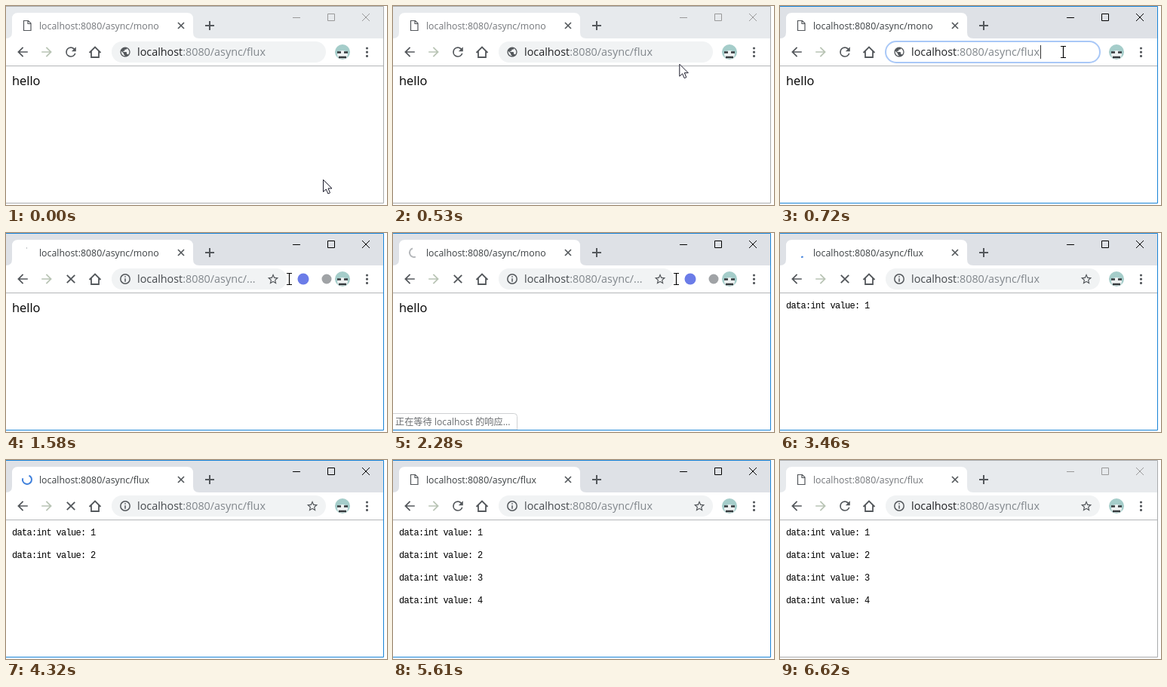
These frames come from a looping animation (505x264 px, 6.74 s). An HTML page:

```html
<!DOCTYPE html>
<html lang="en">
<head>
<meta charset="utf-8">
<title>Streaming response</title>
<style>
  html, body { margin: 0; width: 100%; height: 100%; overflow: hidden; background: #fff; }
  svg { display: block; }
  text { font-family: "Open Sans", "Noto Sans CJK SC", "Noto Sans CJK", sans-serif; white-space: pre; }
  .line { fill: none; stroke: #54585c; }
  .icon { fill: #54585c; }
  #values text { font: 12px "Liberation Mono", monospace; letter-spacing: -.7px; }
</style>
</head>
<body>
<svg width="505" height="264" viewBox="0 0 505 264">
  <rect width="505" height="264" fill="#fff"/>

  <!-- tab strip -->
  <rect id="strip" width="500" height="43"/>
  <path d="M0 43Q8 43 8 35V17Q8 9 16 9H240Q248 9 248 17V35Q248 43 256 43Z" fill="#fff"/>
  <path id="page" class="line" d="M23.5 19.5H29.5L33 23V32.5H23.5ZM29 19.5V23.5H33" stroke-width="1.2"/>
  <circle id="spinner" cx="28" cy="26" r="6" fill="none" stroke-width="2" pathLength="360"/>
  <text id="title" x="44" y="31" font-size="12.35"></text>
  <path class="line" d="M228 22L236 30M236 22L228 30" stroke-width="1.7"/>
  <path class="line" d="M264 26H276M270 20V32" stroke-width="2"/>
  <path id="controls" fill="none" d="M380 15.5H390M426.5 10.5H435.5V19.5H426.5ZM472 10L482 20M482 10L472 20"/>

  <!-- toolbar -->
  <path id="back" class="icon" transform="translate(11.8 50.8) scale(.85)" d="M20 11H7.83l5.59-5.59L12 4l-8 8 8 8 1.41-1.41L7.83 13H20z"/>
  <path fill="#b9c4b5" transform="translate(64.2 50.8) scale(-.85 .85)" d="M20 11H7.83l5.59-5.59L12 4l-8 8 8 8 1.41-1.41L7.83 13H20z"/>
  <path id="reload" class="icon" transform="translate(75.8 50.8) scale(.85)" d="M17.65 6.35A7.96 7.96 0 0 0 12 4a8 8 0 1 0 7.73 10h-2.08A6 6 0 1 1 12 6c1.66 0 3.14.69 4.22 1.78L13 11h7V4z"/>
  <path id="stop" class="line" d="M80.8 55.8L91.2 66.2M91.2 55.8L80.8 66.2" stroke-width="1.9"/>
  <path class="line" d="M110.5 62L118 54.5L125.5 62M113 60V68H123V60" stroke-width="1.8"/>
  <rect id="pill" y="47" x="140" height="28" rx="14"/>
  <path id="globe" class="icon" transform="translate(150.1 53.1) scale(.66)" d="M12 2C6.48 2 2 6.48 2 12s4.48 10 10 10 10-4.48 10-10S17.52 2 12 2zm-1 17.93c-3.95-.49-7-3.85-7-7.93 0-.62.08-1.21.21-1.79L9 15v1c0 1.1.9 2 2 2v1.93zm6.9-2.54c-.26-.81-1-1.39-1.9-1.39h-1v-3c0-.55-.45-1-1-1H8v-2h2c.55 0 1-.45 1-1V7h2c1.1 0 2-.9 2-2v-.41c2.93 1.19 5 4.06 5 7.41 0 2.08-.8 3.97-2.1 5.39z"/>
  <g id="info" class="line" stroke-width="1.5">
    <circle cx="158" cy="61" r="6.2"/>
    <path d="M158 57.2V58.8M158 60.2V64.8"/>
  </g>
  <rect id="selection" x="174" y="51" width="171" height="20" fill="#0078d7"/>
  <text y="66" x="174" font-size="14.37"><tspan id="host">localhost</tspan><tspan id="path"></tspan></text>
  <path id="caret" d="M345.5 52V70" stroke="#333"/>
  <path id="star" class="icon" d="M22 9.24l-7.19-.62L12 2 9.19 8.63 2 9.24l5.46 4.73L5.82 21 12 17.27 18.18 21l-1.63-7.03zM12 15.4l-3.76 2.27 1-4.28-3.32-2.88 4.38-.38L12 6.1l1.71 4.04 4.38.38-3.32 2.88 1 4.28z"/>
  <g id="extensions">
    <circle cx="394" cy="61" r="7.5" fill="#6b7ce8"/>
    <circle cx="425" cy="61" r="6.5" fill="#a0a3a6"/>
  </g>
  <circle cx="446" cy="61" r="10" fill="#a5cdca"/>
  <ellipse cx="446" cy="64.5" rx="7" ry="5.5" fill="#eef2f2"/>
  <path d="M439 61.5H444M448 61.5H453M441 68H451" stroke="#34393c" stroke-width="2.4"/>
  <path d="M478.5 56v0M478.5 61.2v0M478.5 66.4v0" stroke="#54585c" stroke-width="3.2" stroke-linecap="round"/>
  <path d="M0 79.5H500" stroke="#b4b6b8"/>

  <!-- page -->
  <text id="hello" x="8" y="105" font-size="16.4">hello</text>
  <g id="values"></g>
  <g id="status">
    <path d="M0 239.5H160.5Q164.5 239.5 164.5 243.5V261H0" fill="#fff" stroke="#cfd1d3"/>
    <text x="3" y="255" font-size="12.2" fill="#6a6d70">正在等待 localhost 的响应...</text>
  </g>
  <path id="border" fill="none" d="M0 .5H500.5V261.5H0"/>

  <path id="arrow" d="M0 0V16L3.8 12.6L6.4 18.5L9 17.4L6.5 11.5H11.5Z" fill="#fff" stroke="#1a1a2a"/>
  <path id="beam" fill="none" d="M-3.5 -7.5H3.5M0 -7.5V7.5M-3.5 7.5H3.5" stroke="#000" stroke-width="1.2"/>
</svg>
<script>
const LOOP = 6740, FOCUS = 715, SELECT = 890, ENTER = 1575, COMMIT = 2550, DONE = 5600, BLUR = 6615;
const $ = id => document.getElementById(id);
const show = (id, on) => $(id).style.display = on ? '' : 'none';
const set = (id, attrs) => { for (const k in attrs) $(id).setAttribute(k, attrs[k]); };
const write = (id, text) => { if ($(id).textContent !== text) $(id).textContent = text; };
const ease = u => u * u * (3 - 2 * u);
const clamp = u => Math.min(1, Math.max(0, u));

$('values').innerHTML = [1, 2, 3, 4]
  .map(n => `<text x="8" y="${70 + 30 * n}">data:int value: ${n}</text>`).join('');

// Grey arc runs counter-clockwise while waiting; blue arc grows and shrinks while loading.
function drawSpinner(t) {
  let start, sweep;
  if (t < COMMIT) {
    const turn = (t - 1550) / 1320 * 360;
    start = -90 - turn;
    sweep = Math.min(turn, 180);
  } else {
    const e = t - 1590, step = Math.floor(e / 666);
    sweep = 270 * ease(e % 666 / 666) - (step % 2 ? 0 : 270);
    start = 110 + e / 1568 * 360 + Math.floor(step / 2) % 4 * 270;
    if (sweep < 0) { start += sweep; sweep = -sweep; }
    sweep = Math.max(sweep, 5);
  }
  set('spinner', {
    stroke: t < COMMIT ? '#b4b7ba' : '#3f80dc',
    'stroke-dasharray': `${sweep} 360`,
    transform: `rotate(${start} 28 26)`
  });
}

function drawPointer(t) {
  const u = ease(clamp((t - 70) / 570));
  let x = 420.5 - 45 * u, y = 230.5 - 169.5 * u;
  const leaving = t >= 6120 && t < 6280;
  if (leaving) {
    const p = (t - 6120) / 160;
    x = 471 + 7 * p;
    y = 257 - 6.5 * Math.sin(p * Math.PI);
  }
  const text = y < 75;
  show('arrow', leaving || t < COMMIT && !text);
  show('beam', t < COMMIT && text);
  set(text ? 'beam' : 'arrow', { transform: `translate(${x} ${y})` });
}

function draw(t) {
  const active = t >= FOCUS && t < BLUR;
  const editing = t >= FOCUS && t < ENTER;
  const selected = editing && t >= SELECT;
  const waiting = t >= ENTER && t < COMMIT;
  const loading = t >= ENTER && t < DONE;
  const committed = t >= COMMIT;

  set('strip', { fill: active ? '#dee1e6' : '#e7eaed' });
  set('border', { stroke: active ? '#1883d7' : '#a9abad' });
  set('controls', { stroke: active ? '#000' : '#999' });
  set('title', { fill: active ? '#3c4043' : '#74777b' });
  write('title', 'localhost:8080/async/' + (committed ? 'flux' : 'mono'));

  set('pill', {
    width: waiting ? 232 : 284,
    fill: editing ? '#fff' : '#f1f3f4',
    stroke: editing ? '#a9c8f7' : 'none',
    'stroke-width': 2
  });
  set('host', { fill: selected ? '#fff' : '#202124' });
  set('path', { fill: selected ? '#fff' : '#80868b' });
  if (loading || committed && active) set('host', { fill: '#45494d' });
  write('path', ':8080/async/' + (waiting ? '...' : 'flux'));
  set('star', { transform: `translate(${waiting ? 345.4 : 397.4} 52.6) scale(.72)` });

  show('selection', selected);
  show('caret', editing && !selected);
  show('globe', t < ENTER);
  show('info', t >= ENTER);
  show('star', t >= ENTER);
  show('extensions', waiting);
  show('reload', !loading);
  show('stop', loading);
  show('page', !loading);
  show('spinner', loading);
  show('hello', !committed);
  show('status', t >= 1740 && t < 3300);
  [...$('values').children].forEach((row, i) =>
    row.style.display = t >= COMMIT + 1000 * i ? '' : 'none');

  if (loading) drawSpinner(t);
  drawPointer(t);
}

const began = performance.now();
(function tick() {
  draw((performance.now() - began) % LOOP);
  requestAnimationFrame(tick);
})();
</script>
</body>
</html>
```
